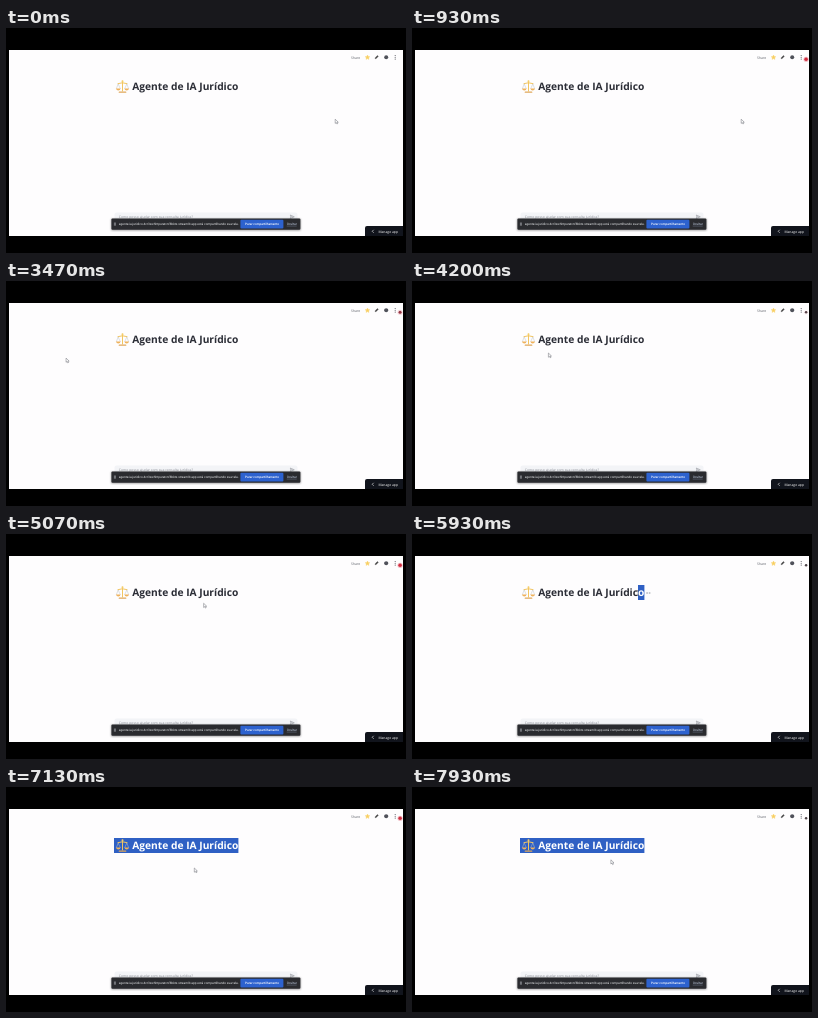
Recreate the animation shown at these times as an HTML page. Size 400x225 px, loop 8000 ms.

```html
<!DOCTYPE html>
<html lang="pt-BR">
<head>
<meta charset="utf-8">
<title>Agente de IA Jurídico</title>
<style>
  html, body { margin: 0; width: 100%; height: 100%; overflow: hidden; background: #000; }
  svg { display: block; width: 100vw; height: 100vh; }
  text { font-family: "Open Sans", "Noto Sans", sans-serif; text-rendering: geometricPrecision; }
  .title { font-size: 10.24px; font-weight: 700; }
  .bar text { font-family: Roboto, sans-serif; font-size: 3.13px; }
</style>
</head>
<body>
<svg viewBox="0 0 400 225">
  <defs>
    <g id="scales" fill="none" stroke-linecap="round">
      <path d="M112.2 56 110.4 60.5M112.2 56 114.2 60.5M120.8 56 118.8 60.5M120.8 56 122.6 60.5" stroke="#bcc2c9" stroke-width=".5"/>
      <path d="M112 55.6Q116.5 53.8 121 55.6M116.5 53.2V63" stroke="#f2c560" stroke-width="1"/>
      <path d="M110 60.4h4.6q-.4 2-2.3 2t-2.3-2zM118.4 60.4h4.6q-.4 2-2.3 2t-2.3-2z" fill="#efb25c"/>
      <path d="M113.3 64.2h6.4" stroke="#dfa75a" stroke-width="1.3"/>
      <circle cx="116.5" cy="53.3" r="1" fill="#f5cd68"/>
    </g>
    <clipPath id="selClip"><rect id="selShape" y="51" height="15"/></clipPath>
    <filter id="soft"><feGaussianBlur stdDeviation=".35"/></filter>
    <filter id="shade"><feGaussianBlur stdDeviation="1"/></filter>
  </defs>

  <rect width="400" height="225"/>
  <rect x="3" y="22" width="394" height="186" fill="#fefdfe" filter="url(#soft)"/>

  <!-- page toolbar -->
  <text x="345.1" y="30.6" font-size="3.45" fill="#5d6069">Share</text>
  <path d="m361.5 27 .7 1.5 1.6.2-1.2 1.1.3 1.6-1.4-.8-1.4.8.3-1.6-1.2-1.1 1.6-.2z" fill="#f8cf62" stroke="#f8cf62" stroke-width=".4"/>
  <path d="m369 30.8.4-1.3 2.1-2.1.9.9-2.1 2.1z" fill="#444" stroke="#444" stroke-width=".3"/>
  <circle cx="380.2" cy="29.2" r="2" fill="#50525a"/>
  <g fill="#55575f"><circle cx="389.2" cy="27.5" r=".55"/><circle cx="389.2" cy="29.3" r=".55"/><circle cx="389.2" cy="31.1" r=".55"/></g>
  <circle id="halo" cx="394.1" cy="31.3" r="2.6" fill="#f0bcc3"/>
  <circle id="dot" cx="394.1" cy="31.3"/>

  <!-- heading -->
  <use href="#scales"/>
  <text class="title" x="126.2" y="62.2" fill="#2b2d36">Agente de IA Jurídico</text>
  <g clip-path="url(#selClip)">
    <rect x="108" y="51" width="125" height="15" fill="#2f60c4"/>
    <use href="#scales"/>
    <text class="title" x="126.2" y="62.2" fill="#fff">Agente de IA Jurídico</text>
  </g>
  <path id="anchor" d="M234.3 59h1.6M236.8 59h1.6" stroke="#8d929c" stroke-width="1" fill="none"/>

  <!-- chat input -->
  <rect x="108.5" y="184.5" width="183" height="12" rx="2" fill="#f3f4f7"/>
  <text x="112.8" y="190.4" font-size="3.45" fill="#8d9099">Como posso ajudar com sua consulta jurídica?</text>
  <path d="m284.3 187 4 1.8-4 1.8.5-1.8zM284.8 188.8h2" fill="none" stroke="#92959d" stroke-width=".6"/>

  <!-- sharing bar -->
  <rect x="105.4" y="191" width="189" height="11.3" fill="#000" opacity=".45" filter="url(#shade)"/>
  <g class="bar" transform="translate(-.6 -.5)">
    <rect x="106" y="191" width="189" height="11.3" rx="1" fill="#2a2b2f"/>
    <path d="M109 195v3.2M110 195v3.2" stroke="#c4c7cc" stroke-width=".5"/>
    <text x="113.4" y="197.8" fill="#eef0f2">agente-ia-juridico-4cr3xwhhtpuratvnf8bktx.streamlit.app está compartilhando sua tela.</text>
    <rect x="235" y="192.2" width="43" height="8.8" rx="1" fill="#2d62cf"/>
    <text x="256.6" y="197.8" fill="#fff" font-weight="500" text-anchor="middle">Parar compartilhamento</text>
    <text x="281.3" y="197.7" fill="#cbd7ee">Ocultar</text>
    <path d="M281.3 198.6h10" stroke="#8c99b5" stroke-width=".35"/>
  </g>

  <path d="M397 198v10h-38v-8q0-2 2-2z" fill="#11141c"/>
  <path d="m367.7 201.8-1.5 1.5 1.5 1.5" fill="none" stroke="#fff" stroke-width=".6"/>
  <text x="372.4" y="204.7" font-size="3.4" font-weight="500" fill="#fff">Manage app</text>

  <path id="arrow" d="M0 0v4.2l1-.9.7 1.5.8-.4-.7-1.4h1.3z" fill="#fff" stroke="#777a80" stroke-width=".55"/>
  <path id="beam" d="M-.8-2.5H.8M0-2.5v5M-.8 2.5H.8" fill="none" stroke="#555" stroke-width=".4"/>
</svg>
<script>
const LOOP = 8000;
const RIGHT = 232.4, LEFT = 108;
// time, x, y of the pointer
const PATH = [
  [0, 329.2, 91.2], [1730, 329.2, 91.2], [2270, 190, 90], [2670, 173.2, 86.3],
  [3130, 120, 82], [3500, 59, 77], [3930, 112, 73], [4200, 136.4, 72],
  [4800, 185, 73], [5600, 232.4, 59], [5800, 232.4, 59], [5930, 226, 59],
  [6500, 108, 59], [6700, 130, 70], [7130, 188.3, 81], [7930, 198.9, 72.8], [8000, 199, 72.6]
];
const $ = id => document.getElementById(id);
const show = (el, on) => el.setAttribute("visibility", on ? "visible" : "hidden");
const mix = (a, b, k) => a + (b - a) * k;

function pointerAt(t) {
  const i = Math.max(1, PATH.findIndex(p => p[0] >= t));
  const [t0, x0, y0] = PATH[i - 1], [t1, x1, y1] = PATH[i];
  const u = (t - t0) / (t1 - t0);
  const k = u * u * (3 - 2 * u);
  return [mix(x0, x1, k), mix(y0, y1, k)];
}

function draw(t) {
  const [x, y] = pointerAt(t);
  const overTitle = y > 51 && y < 66 && x > 107 && x < 240;
  for (const id of ["arrow", "beam"]) $(id).setAttribute("transform", `translate(${x} ${y})`);
  show($("arrow"), !overTitle);
  show($("beam"), overTitle);
  show($("anchor"), overTitle);

  const edge = t < 5800 ? RIGHT : t < 6500 ? x : LEFT;
  $("selShape").setAttribute("x", edge);
  $("selShape").setAttribute("width", Math.max(0, RIGHT - edge));

  // recording light, one pulse every two seconds
  const glow = (1 - Math.cos(t / 1000 * Math.PI)) / 2;
  show($("dot"), t >= 70);
  $("halo").setAttribute("opacity", glow);
  $("dot").setAttribute("r", mix(1.25, 1.75, glow));
  $("dot").setAttribute("fill", `rgb(${mix(74, 212, glow)} ${mix(67, 45, glow)} ${mix(72, 64, glow)})`);
}

const start = performance.now();
function tick() {
  draw((performance.now() - start) % LOOP);
  requestAnimationFrame(tick);
}
tick();
</script>
</body>
</html>
```
